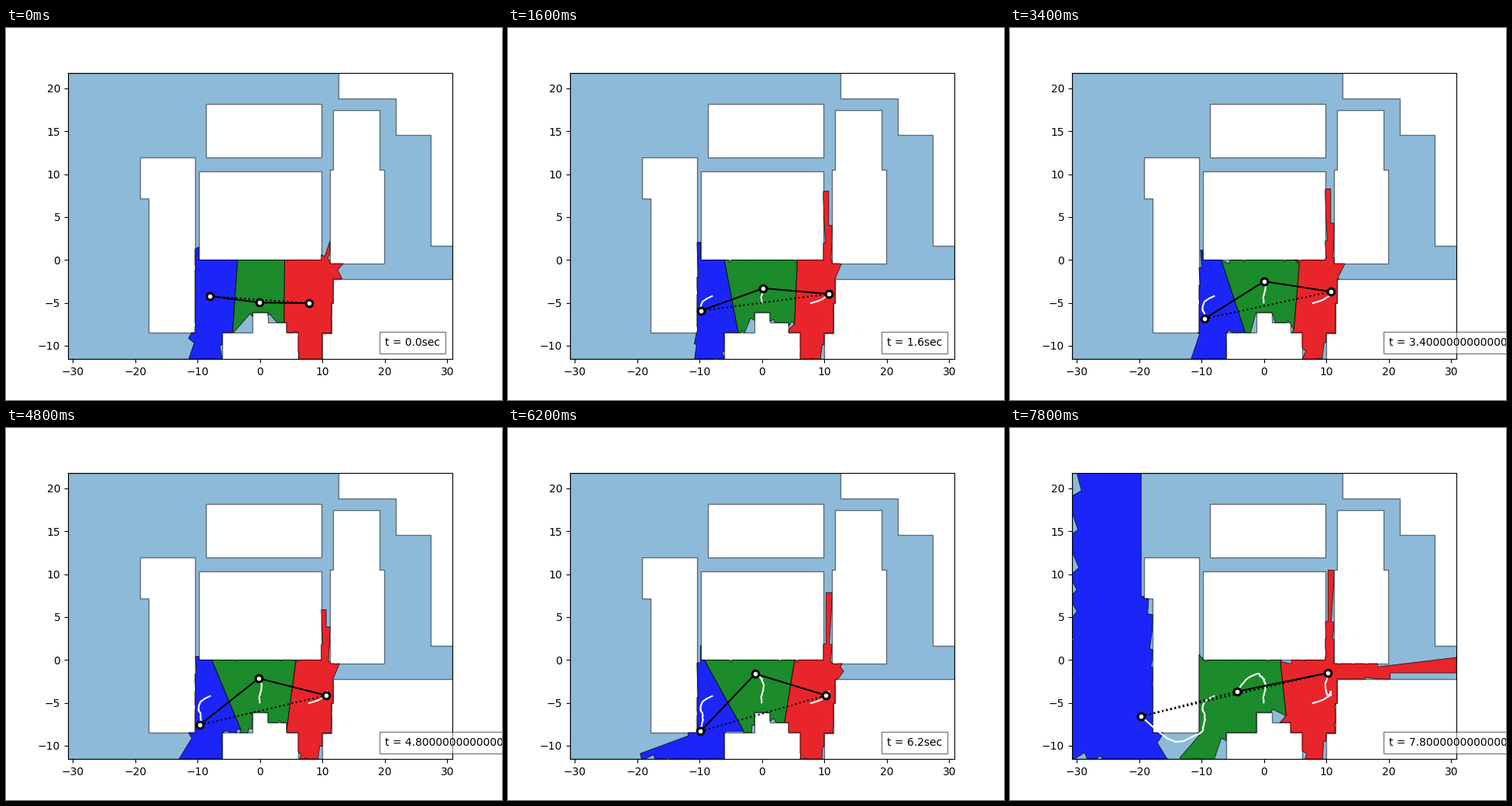
Write a matplotlib script that moves like this. It is 640x480 px and loops after 8 s.

```python
import numpy as np
import matplotlib.pyplot as plt
from matplotlib.animation import FuncAnimation
from matplotlib.colors import to_rgba
from matplotlib.patches import PathPatch, Polygon
from matplotlib.path import Path

FRAMES, STEP_MS = 40, 200
XMIN, XMAX, YMIN, YMAX = -30.8, 30.84, -11.56, 21.84
COLORS = ("blue", "green", "red")
SECTORS = 72
BEAM = 2 * np.pi / SECTORS   # width of one sensor sector
RANGE_STEP = 2.0             # sensor range resolution


def ring(*v):
    """Right-angled outline from alternating x and y moves."""
    xs, ys = v[0::2], v[1::2]
    pts = []
    for i, y in enumerate(ys):
        pts += [(xs[i], y), (xs[(i + 1) % len(xs)], y)]
    return np.array(pts)


# outer wall counter-clockwise, buildings clockwise so they count as holes
RINGS = [
    ring(XMIN, YMIN, -6.09, -8.47, -1.24, -6.12, 1.24, -7.30, 4.23, -8.47,
         6.10, YMIN, 9.95, -8.52, 11.44, -5.04, 11.72, -2.23, XMAX, 1.65,
         27.36, 14.56, 21.76, 18.83, 12.56, YMAX),
    ring(-10.44, -8.47, -17.88, 7.17, -19.27, 11.96),
    ring(9.80, 11.94, -8.70, 18.20),
    ring(9.80, 0.0, -9.82, 10.33),
    ring(19.90, -0.42, 11.22, 10.52, 11.72, 17.43, 19.15, 10.52),
]
STARTS = np.concatenate(RINGS)
EDGES = np.concatenate([np.roll(r, -1, axis=0) - r for r in RINGS])

# key points of the three routes, as x + yj
KEYS = (0, 2, 4, 12, 17, 24, 31, 35, 39)
ROUTES = (
    (-8.02 - 4.22j, -9.55 - 4.86j, -9.88 - 5.71j, -9.56 - 6.21j, -9.50 - 6.84j,
     -9.66 - 7.57j, -9.88 - 8.32j, -14.2 - 9.56j, -19.71 - 6.57j),
    (-0.06 - 4.97j, -0.15 - 4.45j, 0.02 - 4.0j, 0.25 - 2.87j, 0.02 - 2.5j,
     -0.23 - 2.15j, -1.08 - 1.62j, -2.9 - 2.3j, -4.31 - 3.68j),
    (7.83 - 5.04j, 9.6 - 4.6j, 10.43 - 4.22j, 10.685 - 3.86j, 10.685 - 3.7j,
     10.6 - 4.13j, 10.25 - 4.13j, 9.83 - 3.1j, 10.25 - 1.51j),
)


def ease(keys, vals, t):
    """Smooth curve through the key values that never overshoots them."""
    keys, vals = np.array(keys, float), np.array(vals)
    h = np.diff(keys)
    slope = np.diff(vals) / h
    a, b = slope[:-1], slope[1:]
    inner = np.where(a * b > 0, 2 * a * b / np.where(a + b == 0, 1, a + b), 0)
    m = np.concatenate([slope[:1], inner, slope[-1:]])
    i = np.clip(np.searchsorted(keys, t, side="right") - 1, 0, len(h) - 1)
    u = (t - keys[i]) / h[i]
    rise = vals[i + 1] - vals[i]
    return (vals[i] + rise * u * u * (3 - 2 * u)
            + h[i] * u * (1 - u) * (m[i] * (1 - u) - m[i + 1] * u))


def walk(route, rng):
    steps = np.arange(FRAMES)
    z = np.array(route)
    pos = np.column_stack([ease(KEYS, z.real, steps), ease(KEYS, z.imag, steps)])
    wobble = rng.normal(0, 0.05, pos.shape)
    wobble[list(KEYS)] = 0
    return pos + wobble


def cross(a, b):
    return a[..., 0] * b[..., 1] - a[..., 1] * b[..., 0]


def unit(angles):
    return np.column_stack([np.cos(angles), np.sin(angles)])


def cast(origin, dirs):
    """Distance to the nearest wall along each direction."""
    d = dirs[:, None, :]
    rel = STARTS - origin
    with np.errstate(divide="ignore", invalid="ignore"):
        det = cross(d, EDGES)
        t = cross(rel, EDGES) / det
        u = cross(rel, d) / det
    hit = (t > 1e-9) & (u >= 0) & (u <= 1)
    return np.where(hit, t, 60.0).min(axis=1)


def sees(a, b):
    return cast(a, (b - a)[None, :])[0] > 1


def sector_ranges(origin):
    r = np.ceil(cast(origin, unit(np.arange(SECTORS) * BEAM)) / RANGE_STEP) * RANGE_STEP
    return np.minimum(r, np.roll(r, -1))


def chord(r, part):
    """Radius of a flat-ended sector at an angle inside it."""
    return r * np.cos(BEAM / 2) / np.cos(part - BEAM / 2)


PART = np.tile(np.linspace(0, BEAM, 11), SECTORS)
INDEX = np.repeat(np.arange(SECTORS), 11)
RAYS = unit(INDEX * BEAM + PART)


def cell(k, agents, ranges):
    """Area in sight of one agent, up to the midlines the others can see."""
    reach = chord(ranges[k][INDEX], PART)
    for j, other in enumerate(agents):
        if j == k:
            continue
        gap = other - agents[k]
        along = RAYS @ gap
        mid = np.where(along > 1e-6, gap @ gap / 2 / np.maximum(along, 1e-6), 1e3)
        back = agents[k] + mid[:, None] * RAYS - other
        angle = np.arctan2(back[:, 1], back[:, 0]) % (2 * np.pi)
        sector = (angle // BEAM).astype(int) % SECTORS
        seen = np.hypot(*back.T) <= chord(ranges[j][sector], angle % BEAM)
        reach = np.where(seen, np.minimum(reach, mid), reach)
    return agents[k] + reach[:, None] * RAYS


rng = np.random.default_rng(4)
tracks = [walk(route, rng) for route in ROUTES]

fig, ax = plt.subplots(figsize=(6.4, 4.8), dpi=100)
ax.set_xlim(XMIN, XMAX)
ax.set_ylim(YMIN, YMAX)

room = Path.make_compound_path(
    *(Path(np.vstack([r, r[:1]]), closed=True) for r in RINGS))
ax.add_patch(PathPatch(room, fc="tab:blue", ec="black", alpha=0.5))

cells, walls, trails = [], [], []
ink = to_rgba("black", 0.8)
for color in COLORS:
    area = Polygon([(0, 0), (1, 0), (0, 1)], fc=to_rgba(color, 0.8), ec=ink,
                   lw=0.6, zorder=1.5)
    ax.add_patch(area)
    area.set_clip_path(room, ax.transData)
    wall = PathPatch(room, fc="none", ec=ink, lw=0.6, snap=False, zorder=1.6)
    ax.add_patch(wall)
    cells.append(area)
    walls.append(wall)
    trails += ax.plot([], [], color="white", lw=1.5, zorder=2)

PAIRS = ((0, 2), (0, 1), (1, 2))
links = [ax.plot([], [], color="black", lw=1.5, zorder=2.2)[0] for _ in PAIRS]
dots, = ax.plot([], [], "o", mfc="white", mec="black", ms=6.3, mew=2.2, zorder=2.3)
clock = ax.text(20, -10, "", bbox=dict(facecolor="white", alpha=0.5, pad=5))


def draw(i):
    agents = np.array([track[i] for track in tracks])
    ranges = [sector_ranges(a) for a in agents]
    for k in range(3):
        poly = cell(k, agents, ranges)
        cells[k].set_xy(poly)
        edge = Path(np.vstack([poly, poly[:1]]), closed=True)
        walls[k].set_clip_path(edge, ax.transData)
        trails[k].set_data(*tracks[k][:i + 1].T)
    for (a, b), link in zip(PAIRS, links):
        link.set_data(*agents[[a, b]].T)
        joined = b - a == 1 and sees(agents[a], agents[b])
        link.set_linestyle("-" if joined else ":")
    dots.set_data(*agents.T)
    clock.set_text(f"t = {i * 0.2}sec")


anim = FuncAnimation(fig, draw, frames=FRAMES, interval=STEP_MS,
                     repeat=True, repeat_delay=0)
plt.show()
```
